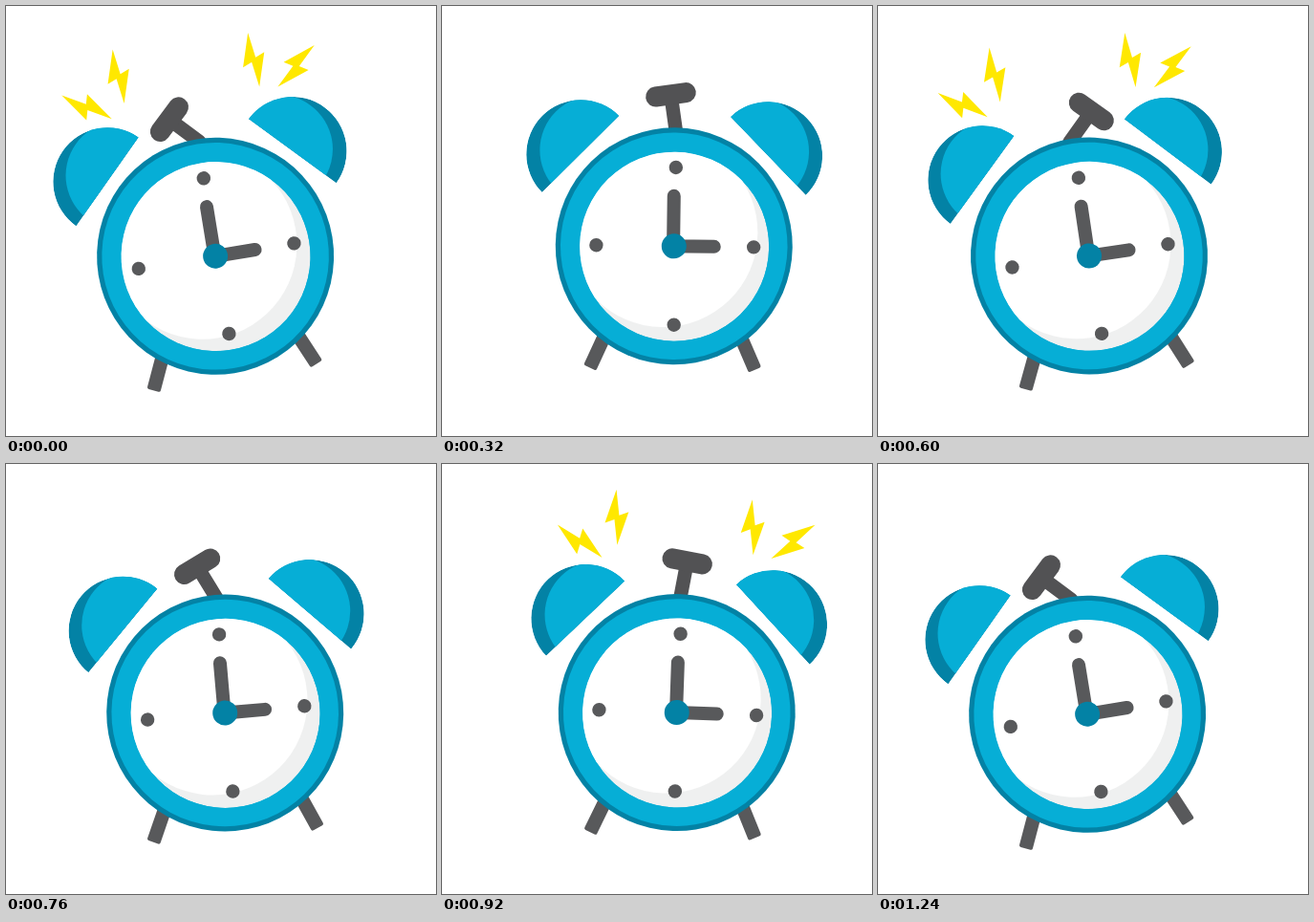
An HTML page that plays this animation: 450x450 px, repeating every 1280 ms.

```html
<!DOCTYPE html>
<html lang="en">
<head>
<meta charset="utf-8">
<title>Ringing alarm clock</title>
<style>
  html, body { margin: 0; height: 100%; overflow: hidden; background: #fff; }
  svg { display: block; width: 100%; height: 100%; }
  .light { fill: #06aed6; }
  .dark { fill: #0382a5; }
  .grey { fill: #58595b; }
  .line { stroke: #58595b; stroke-width: 14; stroke-linecap: round; fill: none; }
  #hammer .line { stroke: #525254; }
  #bolts { fill: #ffe800; }
</style>
</head>
<body>
<svg viewBox="0 0 450 450">
  <defs>
    <clipPath id="dome"><path d="M-56.8 0A56.8 56.8 0 0 1 56.8 0Z"/></clipPath>
    <clipPath id="dial"><circle r="99"/></clipPath>
    <g id="bell" clip-path="url(#dome)">
      <circle class="dark" r="56.8"/>
      <circle class="light" cx="13" cy="7" r="56.8"/>
    </g>
    <polygon id="bolt" points="0,-29 2.5,-2 12.5,-5.5 0,29 -2.5,2 -12.5,5.5"/>
    <rect id="leg" class="grey" x="-7.2" y="-42" width="14.4" height="42" rx="2"/>
  </defs>
  <!-- origin of the clock is the centre of its dial -->
  <g id="clock">
    <g id="bolts">
      <use href="#bolt" transform="translate(72.6 -196.4) rotate(-2.7)"/>
      <use href="#bolt" transform="translate(-69.9 -201.9) rotate(-2.7)"/>
      <use href="#bolt" transform="translate(115.4 -182.8) rotate(50.6)"/>
      <use href="#bolt" transform="translate(-107.7 -175.6) rotate(-55.5)"/>
    </g>
    <use href="#bell" transform="translate(-99 -95) rotate(-45.6)"/>
    <use href="#bell" transform="translate(97.3 -95.6) rotate(45.4) scale(-1 1)"/>
    <use href="#leg" transform="translate(-86.4 128.3) rotate(24)"/>
    <use href="#leg" transform="translate(86.4 128.3) rotate(-24)"/>
    <g id="hammer">
      <path class="line" style="stroke-width:14.5" d="M0 4V-35"/>
      <path class="line" style="stroke-width:21" d="M-16 -35.3H16"/>
    </g>
    <circle class="dark" r="124"/>
    <circle class="light" r="118.8"/>
    <g transform="translate(.4 .4)" clip-path="url(#dial)">
      <circle r="99" fill="#eff0f0"/>
      <circle cx="-12" cy="-14.5" r="99" fill="#fff"/>
    </g>
    <g class="grey">
      <circle cx="1" cy="-82.4" r="7.2"/>
      <circle cx="1" cy="82.4" r="7.2"/>
      <circle cx="-81.4" r="7.2"/>
      <circle cx="83.4" r="7.2"/>
    </g>
    <path class="line" d="M-.7 -52.5V0H42"/>
    <circle class="dark" r="13"/>
  </g>
</svg>
<script>
  const LOOP = 1280, STEP = 40, BLINK = LOOP / STEP / 6;
  const [clock, hammer, bolts] = ['clock', 'hammer', 'bolts'].map(id => document.getElementById(id));

  // Keys are [step, value] pairs joined by straight lines.
  const tilt = [[0, -9.26], [9, 2], [16, -10.2], [23, 2], [31, -9.26]];
  const hop = [[0, 0], [6, 11.6], [14, 0], [31, 0]];
  const swing = [[0, -44], [5, 44], [10, -44], [15, 44], [20, -44], [25, 44], [31, -44]];

  function at(keys, step) {
    const i = keys.findIndex(([s], n) => n && step <= s);
    const [s0, v0] = keys[i - 1], [s1, v1] = keys[i];
    return v0 + (v1 - v0) * (step - s0) / (s1 - s0);
  }

  function draw(now) {
    const step = Math.floor(now % LOOP / STEP);
    // The clock rocks on a pivot between its feet.
    clock.setAttribute('transform',
      `translate(241 ${396 - at(hop, step)}) rotate(${at(tilt, step)}) translate(0 -136)`);
    hammer.setAttribute('transform', `translate(0 -123.6) rotate(${at(swing, step)})`);
    bolts.setAttribute('visibility', Math.floor(step / BLINK) % 2 ? 'hidden' : 'visible');
  }

  const start = performance.now();
  (function tick() {
    draw(performance.now() - start);
    requestAnimationFrame(tick);
  })();
</script>
</body>
</html>
```
